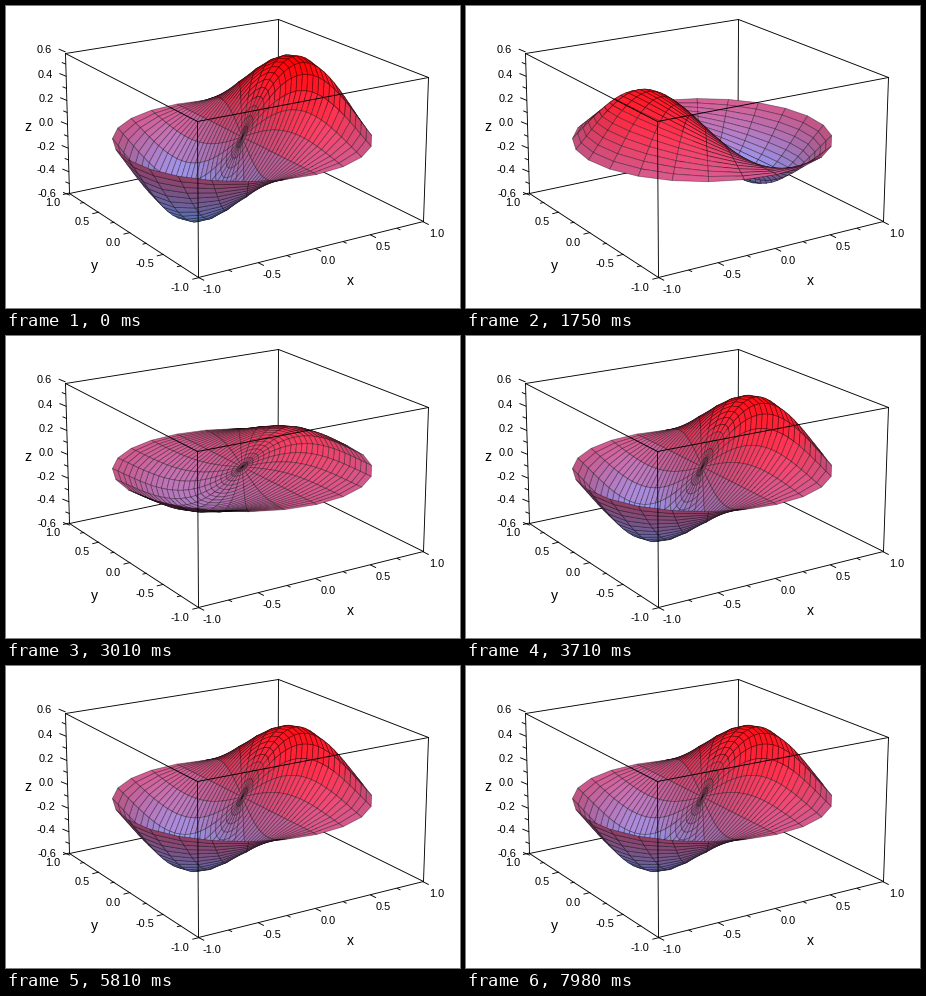
These frames come from a looping animation (454x302 px, 8000 ms). A matplotlib script:

```python
import numpy as np
import matplotlib.pyplot as plt
from matplotlib.animation import FuncAnimation
from matplotlib.collections import PolyCollection

WIDTH, HEIGHT, DPI = 454, 302, 100
PX = 72 / DPI
LOOP_MS, STEP_MS = 8000, 20
Z_MAX = 0.5819  # peak of the Bessel function J1
N_MESH = 25

# Corners of the box, (x, y, z) in units of its half sizes -> pixel
CORNERS = {
    (-1, 1, 1): (59, 47), (1, 1, 1): (272, 13), (1, -1, 1): (422, 71),
    (-1, -1, 1): (191, 115), (-1, 1, -1): (63, 187),
    (-1, -1, -1): (192, 271), (1, -1, -1): (417, 215),
}


def fit_camera():
    """Perspective matrix that maps the box corners to their pixels."""
    rows = []
    for corner, (u, v) in CORNERS.items():
        p = np.array([*corner, 1.0])
        rows.append([*p, *(0 * p), *(-u / 200 * p)])
        rows.append([*(0 * p), *p, *(-v / 200 * p)])
    matrix = np.linalg.svd(np.array(rows))[2][-1].reshape(3, 4)
    matrix = matrix / matrix[2, 3]
    matrix[:2] *= 200
    return matrix


CAMERA = fit_camera()


def project(x, y, z):
    """Return pixel positions and depth of points given in box units."""
    x, y, z = np.broadcast_arrays(x, y, z)
    points = np.stack([x, y, z, np.ones(x.shape)], axis=-1)
    u, v, w = np.moveaxis(points @ CAMERA.T, -1, 0)
    return np.stack([u / w, v / w], axis=-1), w


def bessel1(x):
    tau = (np.arange(200) + 0.5) * np.pi / 200
    return np.cos(tau - x[..., None] * np.sin(tau)).mean(axis=-1)


def unit(vector):
    vector = np.asarray(vector, float)
    return vector / np.linalg.norm(vector, axis=-1, keepdims=True)


radius, angle = np.meshgrid(np.linspace(0, 1, N_MESH),
                            np.linspace(0, 2 * np.pi, N_MESH), indexing="ij")
X, Y = radius * np.cos(angle), radius * np.sin(angle)
MODE = bessel1(3.8317 * radius) / Z_MAX * np.cos(angle)

VIEW = unit([-0.51, -0.80, 0.31])
LIGHT = unit([-0.25, -0.45, 0.86])
LOW, HIGH = np.array([100, 149, 237]) / 255, np.array([1.0, 0, 0])


def quads(grid):
    """Four corners of every mesh cell."""
    cells = np.stack([grid[:-1, :-1], grid[1:, :-1],
                      grid[1:, 1:], grid[:-1, 1:]], axis=2)
    return cells.reshape(-1, 4, *grid.shape[2:])


def membrane(amplitude):
    """Cells of the membrane from back to front, with their colours."""
    z = amplitude * MODE
    pixels, depth = project(X, Y, z)
    order = np.argsort(-quads(depth).mean(axis=1))

    cells = quads(np.stack([X, Y, z * Z_MAX], axis=-1))
    normal = unit(np.cross(cells[:, 2] - cells[:, 0], cells[:, 3] - cells[:, 1]))
    normal *= np.where(normal @ VIEW < 0, -1, 1)[:, None]
    shade = 0.82 + 0.42 * np.clip(normal @ LIGHT, 0, 1)

    level = (quads(z).mean(axis=1)[:, None] + 1) / 2
    colors = np.clip((LOW + (HIGH - LOW) * level) * shade[:, None], 0, 1)
    return quads(pixels)[order], colors[order]


def pose_index(ms):
    """Number of the pose; the first of every 16 is held longer."""
    cycle, rest = divmod(ms, 3430)
    return 16 * cycle + (0 if rest < 280 else 1 + (rest - 280) // 210)


fig = plt.figure(figsize=(WIDTH / 100, HEIGHT / 100), dpi=DPI, facecolor="white")
ax = fig.add_axes([0, 0, 1, 1])
ax.set_xlim(-0.5, WIDTH - 0.5)
ax.set_ylim(HEIGHT - 0.5, -0.5)
ax.axis("off")


def line(points, zorder=3):
    xs, ys = zip(*points)
    ax.plot(xs, ys, color="black", lw=0.9 * PX, zorder=zorder)


def label(x, y, text, size=11, ha="center"):
    ax.text(x, y, text, fontsize=size * PX, family="Liberation Sans",
            ha=ha, va="center_baseline", color="black", zorder=4)


def axis_ticks(place, values, majors, direction, offset, ha="center"):
    """Ticks along one box edge, with a number at each major one."""
    dx, dy = direction
    for value in values:
        (u, v), _ = project(*place(value))
        major = any(abs(value - m) < 1e-6 for m in majors)
        length = 1.0 if major else 0.55
        line([(u, v), (u + dx * length, v + dy * length)])
        if major:
            label(u + offset[0], v + offset[1], f"{value + 0.0:.1f}", ha=ha)


# Edges that meet the far side of the box lie behind the membrane.
FAR_BOTTOM = (1, 1, -1)
CORNERS[FAR_BOTTOM] = tuple(project(*FAR_BOTTOM)[0])
for start in CORNERS:
    for end in CORNERS:
        differs = sum(a != b for a, b in zip(start, end))
        if start < end and differs == 1:
            behind = (1, 1, 1) in (start, end) or FAR_BOTTOM in (start, end)
            line([CORNERS[start], CORNERS[end]], zorder=1 if behind else 3)

quarters = [i / 4 for i in range(-4, 5)]
halves = quarters[::2]
tenths = [i / 10 for i in range(-6, 7)]
axis_ticks(lambda x: (x, -1, -1), quarters, halves, (5, 2.5), (13, 11))
axis_ticks(lambda y: (-1, y, -1), quarters, halves, (-6, 1.5), (-9, 9), "right")
axis_ticks(lambda z: (-1, 1, z / Z_MAX), tenths, tenths[::2], (-6, -2.5),
           (-13, -2.5), "right")
label(21, 119, "z", 14)
label(88, 258, "y", 14)
label(344, 273, "x", 14)

surface = PolyCollection([], edgecolors=(0, 0, 0, 0.4), linewidths=0.8 * PX, zorder=2)
ax.add_collection(surface, autolim=False)


def update(frame):
    turns = 0.3 * pose_index(frame * STEP_MS + STEP_MS // 2) - 0.01
    cells, colors = membrane(np.cos(2 * np.pi * turns))
    surface.set_verts(cells)
    surface.set_facecolor(colors)
    return [surface]


anim = FuncAnimation(fig, update, frames=LOOP_MS // STEP_MS, interval=STEP_MS,
                     repeat=True, repeat_delay=0, blit=False)
plt.show()
```
